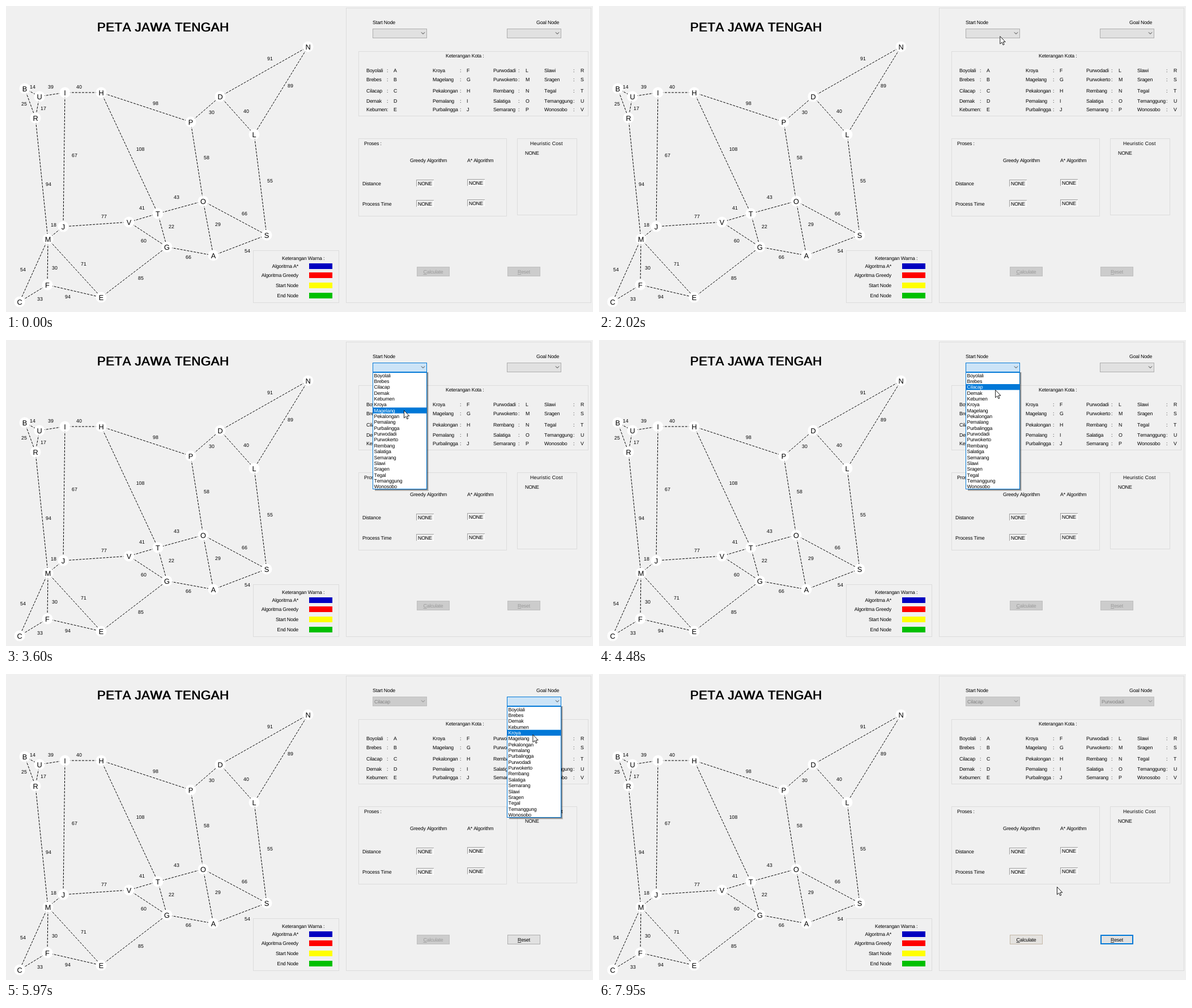
These frames come from a looping animation (1036 px wide and 541 px high, 8000 ms). An HTML page with a canvas:

```html
<!DOCTYPE html>
<html lang="id">
<head>
<meta charset="utf-8">
<title>Peta Jawa Tengah</title>
<style>
html, body { margin: 0; width: 100%; height: 100%; overflow: hidden; background: #f0f0f0; }
canvas { display: block; }
</style>
</head>
<body>
<canvas id="stage" width="1036" height="541"></canvas>
<script>
const ctx = document.getElementById('stage').getContext('2d');
const LOOP = 8000;
const BLUE = '#0078d7';
const FACE = '#f0f0f0';
const FAMILY = '"Liberation Sans", Arial, sans-serif';
const ROW = 10.35, LIST_TOP = 57.3;

const nodes = {
  B: [33, 146], U: [59, 160], I: [104, 153], H: [168, 153], R: [52, 198],
  P: [326, 205], D: [378, 160], N: [533, 72], L: [438, 227], O: [348, 345],
  T: [268, 367], V: [217, 382], J: [101, 390], M: [74, 412], G: [284, 426],
  A: [366, 441], S: [460, 405], F: [73, 493], E: [168, 515], C: [24, 523]
};

// edge, distance, label position
const edges = [
  ['BU', 14, 47, 143], ['UI', 39, 79, 143], ['IH', 40, 129, 143], ['BR', 25, 32, 173],
  ['UR', 17, 66, 181], ['RM', 94, 75, 315], ['IJ', 67, 121, 264], ['HP', 98, 264, 172],
  ['HT', 108, 237, 253], ['PD', 30, 363, 188], ['DN', 91, 466, 93], ['NL', 89, 502, 141],
  ['DL', 40, 424, 186], ['PO', 58, 354, 268], ['LS', 55, 466, 309], ['OT', 43, 301, 338],
  ['TV', 41, 240, 357], ['VJ', 77, 173, 372], ['JM', 18, 84, 387], ['VG', 60, 243, 415],
  ['TG', 22, 292, 390], ['GA', 66, 322, 444], ['OA', 29, 374, 386], ['OS', 66, 421, 367],
  ['AS', 54, 426, 433], ['MC', 54, 30, 466], ['MF', 30, 86, 463], ['ME', 71, 137, 456],
  ['FC', 33, 60, 518], ['FE', 94, 109, 514], ['EG', 85, 238, 481]
];

const cities = ['Boyolali', 'Brebes', 'Cilacap', 'Demak', 'Kebumen', 'Kroya', 'Magelang',
  'Pekalongan', 'Pemalang', 'Purbalingga', 'Purwodadi', 'Purwokerto', 'Rembang', 'Salatiga',
  'Semarang', 'Slawi', 'Sragen', 'Tegal', 'Temanggung', 'Wonosobo'];
const goals = cities.filter(c => c !== 'Cilacap');
const codes = 'ABCDEFGHIJLMNOPRSTUV';

// pointer moves: start, end, steps, from, to, ease-out power
const moves = [
  [720, 1480, 12, [1013, 553], [763, 180], 1],
  [1550, 2300, 12, [763, 180], [706, 50], 3.4],
  [2770, 3530, 12, [706, 50], [702, 123], 0.88],
  [3600, 3600, 1, [702, 123], [702, 124], 1],
  [3810, 4550, 10, [702, 124], [699, 86], 1.3],
  [4750, 5430, 11, [699, 86], [932, 50], 1.6],
  [5580, 6310, 12, [932, 50], [928, 137.2], 1.2],
  [6380, 6800, 7, [928, 137.2], [925, 161.6], 1],
  [7020, 7080, 2, [925, 161.6], [925, 158], 1],
  [7350, 7950, 10, [925, 158], [808, 376], 1]
];
const clicks = [[2230, 2370], [4680, 4750], [5430, 5580], [7280, 7350]];

const within = (t, a, b) => t >= a && t < b;

function pointer(t) {
  const move = moves.filter(m => t >= m[0]).pop();
  if (!move) return null;
  const [start, end, steps, from, to, power] = move;
  const span = (end - start) / Math.max(1, steps - 1) || 1;
  const k = Math.min(steps, Math.floor((t - start) / span + 0.3) + 1);
  const u = 1 - Math.pow(1 - k / steps, power);
  return from.map((v, i) => v + (to[i] - v) * u);
}

function text(str, x, cy, { size = 8.8, color = '#000', align = 'left', gap = -0.2 } = {}) {
  ctx.font = `${size}px ${FAMILY}`;
  ctx.textRendering = 'geometricPrecision';
  ctx.letterSpacing = gap + 'px';
  ctx.fontKerning = 'none';
  ctx.textAlign = align;
  ctx.fillStyle = color;
  ctx.fillText(str, x, cy + size * 0.36);
}

function fill(x, y, w, h, color) {
  ctx.fillStyle = color;
  ctx.fillRect(x, y, w, h);
}

function frame(x, y, w, h, color, line = 1) {
  ctx.strokeStyle = color;
  ctx.lineWidth = line;
  ctx.strokeRect(x + line / 2, y + line / 2, w - line, h - line);
}

function box(x, y, w, h, bg, border, line) {
  fill(x, y, w, h, bg);
  frame(x, y, w, h, border, line);
}

function drawMap() {
  // the heading is a regular face thickened by a second pass
  for (const x of [160.4, 161.3]) text('PETA JAWA TENGAH', x, 37, { size: 22.4, gap: 0.4 });
  ctx.strokeStyle = '#000';
  ctx.lineWidth = 1;
  ctx.setLineDash([4, 2]);
  for (const [pair] of edges) {
    ctx.beginPath();
    ctx.moveTo(...nodes[pair[0]]);
    ctx.lineTo(...nodes[pair[1]]);
    ctx.stroke();
  }
  ctx.setLineDash([]);
  for (const [, cost, x, y] of edges) text(String(cost), x, y, { align: 'center', gap: 0 });
  for (const [name, [x, y]] of Object.entries(nodes)) {
    ctx.fillStyle = '#fff';
    ctx.beginPath();
    ctx.arc(x, y, 9.5, 0, Math.PI * 2);
    ctx.fill();
    text(name, x, y, { size: 12.8, align: 'center', gap: 0 });
  }
}

function drawLegend() {
  box(436, 432, 152, 93, FACE, '#dcdcdc');
  text('Keterangan Warna :', 487, 446);
  const rows = [['Algoritma A*', 460, '#0000c0'], ['Algoritma Greedy', 476, '#ff0000'],
    ['Start Node', 494, '#ffff00'], ['End Node', 512, '#00c000']];
  for (const [label, y, color] of rows) {
    text(label, 516, y, { align: 'right' });
    fill(535, y - 5, 41, 10, color);
  }
}

function drawPanels() {
  frame(600, 3, 433, 522, '#dcdcdc');
  frame(622, 80, 406, 115, '#dcdcdc');
  frame(622, 234, 262, 138, '#dcdcdc');
  frame(902, 234, 106, 136, '#dcdcdc');
  text('Start Node', 647, 29);
  text('Goal Node', 936, 29);
  text('Keterangan Kota :', 776, 88);

  const cols = [[636, 672, 684], [753, 801, 813], [860, 904, 917], [950, 1001, 1014]];
  const rows = [114, 130, 150, 168, 183];
  cities.forEach((city, i) => {
    const [x, colon, code] = cols[Math.floor(i / 5)];
    const y = rows[i % 5];
    text(city, x, y);
    text(':', colon, y);
    text(codes[i], code, y);
  });

  text('Proses :', 632, 243);
  text('Greedy Algorithm', 713, 273);
  text('A* Algorithm', 814, 273);
  text('Distance', 629, 314);
  text('Process Time', 629, 350);
  text('Heuristic Cost', 925, 243, { gap: 0.2 });
  text('NONE', 916, 260);
  for (const [x, y] of [[724, 307], [814, 306], [724, 343], [814, 342]]) {
    frame(x, y, 31, 12, '#fff');
    fill(x, y, 31, 1, '#a0a0a0');
    fill(x, y, 1, 12, '#a0a0a0');
    text('NONE', x + 3, y + 6.5);
  }
}

const comboLooks = {
  normal: ['#e1e1e1', '#adadad', '#333'],
  hover: ['#e5f1fb', BLUE, '#333'],
  open: ['#cce4f7', BLUE, '#333'],
  off: ['#cccccc', '#bfbfbf', '#838383']
};

function drawCombo(x, look, value = '') {
  const [bg, border, ink] = comboLooks[look];
  box(x, 40, 96, 17, bg, border);
  text(value, x + 3, 48.5, { color: ink });
  ctx.strokeStyle = ink;
  ctx.lineWidth = 1;
  ctx.beginPath();
  ctx.moveTo(x + 86, 46.5);
  ctx.lineTo(x + 89, 49.5);
  ctx.lineTo(x + 92, 46.5);
  ctx.stroke();
}

function shadow(x, bottom) {
  for (let i = 3; i > 0; i--) {
    const tone = `rgba(0,0,0,${0.16 + 0.04 * (3 - i)})`;
    fill(x + 4, 57, 92 + i, bottom - 57 + i, tone);
  }
}

function drawList(x, items, cursor) {
  const bottom = Math.round(LIST_TOP + items.length * ROW);
  const picked = Math.floor((cursor[1] - LIST_TOP) / ROW);
  shadow(x, bottom);
  box(x, 57, 96, bottom - 57, '#fff', BLUE);
  items.forEach((item, i) => {
    const y = LIST_TOP + i * ROW;
    if (i === picked) fill(x + 1, y, 94, ROW, BLUE);
    text(item, x + 2.5, y + ROW / 2, { color: i === picked ? '#fff' : '#000' });
  });
}

// The list is caught partway through sliding down.
function drawSlide(x, items) {
  shadow(x, 111);
  fill(x, 57, 96, 54, FACE);
  fill(x, 57, 96, 37, '#fff');
  ctx.save();
  ctx.beginPath();
  ctx.rect(x, 57, 96, 37);
  ctx.clip();
  items.slice(-6).forEach((item, i) => text(item, x + 2.5, 54 + i * ROW));
  ctx.restore();
}

const buttonLooks = {
  off: ['#cccccc', '#bfbfbf', '#989898', 1],
  normal: ['#e1e1e1', '#adadad', '#000', 1],
  warm: ['#e4e2df', '#c4b8a8', '#000', 1],
  focus: ['#e1e1e1', BLUE, '#000', 2]
};

function drawButton(x, label, look) {
  const [bg, border, ink, line] = buttonLooks[look];
  box(x, 461, 58, 17, bg, border, line);
  text(label, x + 29, 469.5, { color: ink, align: 'center' });
  const left = x + 29 - ctx.measureText(label).width / 2;
  fill(left, 474, ctx.measureText(label[0]).width, 0.8, ink);
}

function drawPointer([x, y], clicked) {
  if (clicked) {
    ctx.fillStyle = 'rgba(255,240,0,0.55)';
    ctx.beginPath();
    ctx.arc(x, y, 9, 0, Math.PI * 2);
    ctx.fill();
  }
  const shape = [[0, 0], [0, 16.2], [3.8, 12.7], [6.4, 18.4], [8.8, 17.4], [6.4, 11.8], [11.2, 11.8]];
  ctx.beginPath();
  shape.forEach(([px, py]) => ctx.lineTo(x + 0.5 + px * 0.83, y + 0.5 + py * 0.83));
  ctx.closePath();
  ctx.fillStyle = '#fff';
  ctx.fill();
  ctx.strokeStyle = '#000';
  ctx.lineWidth = 0.9;
  ctx.stroke();
}

function draw(t) {
  const cursor = pointer(t);
  const startDone = t >= 4750, goalDone = t >= 7350;
  const startOpen = within(t, 2370, 4750), goalOpen = within(t, 5580, 7350);

  fill(0, 0, 1036, 541, FACE);
  drawMap();
  drawLegend();
  drawPanels();
  drawButton(725, 'Calculate', goalDone ? 'warm' : 'off');
  drawButton(885, 'Reset', goalDone ? 'focus' : startDone ? 'normal' : 'off');

  drawCombo(647, startDone ? 'off' : startOpen ? 'open' : t >= 2085 ? 'hover' : 'normal',
    startDone ? 'Cilacap' : '');
  drawCombo(884, goalDone ? 'off' : goalOpen ? 'open' : t >= 5360 ? 'hover' : 'normal',
    goalDone ? 'Purwodadi' : '');

  if (within(t, 2300, 2370)) drawSlide(647, cities);
  if (within(t, 5510, 5580)) drawSlide(884, goals);
  if (startOpen) drawList(647, cities, cursor);
  if (goalOpen) drawList(884, goals, cursor);
  if (cursor) drawPointer(cursor, clicks.some(([a, b]) => within(t, a, b)));
}

const begin = performance.now();
function tick() {
  draw((performance.now() - begin) % LOOP);
  requestAnimationFrame(tick);
}
tick();
</script>
</body>
</html>
```
